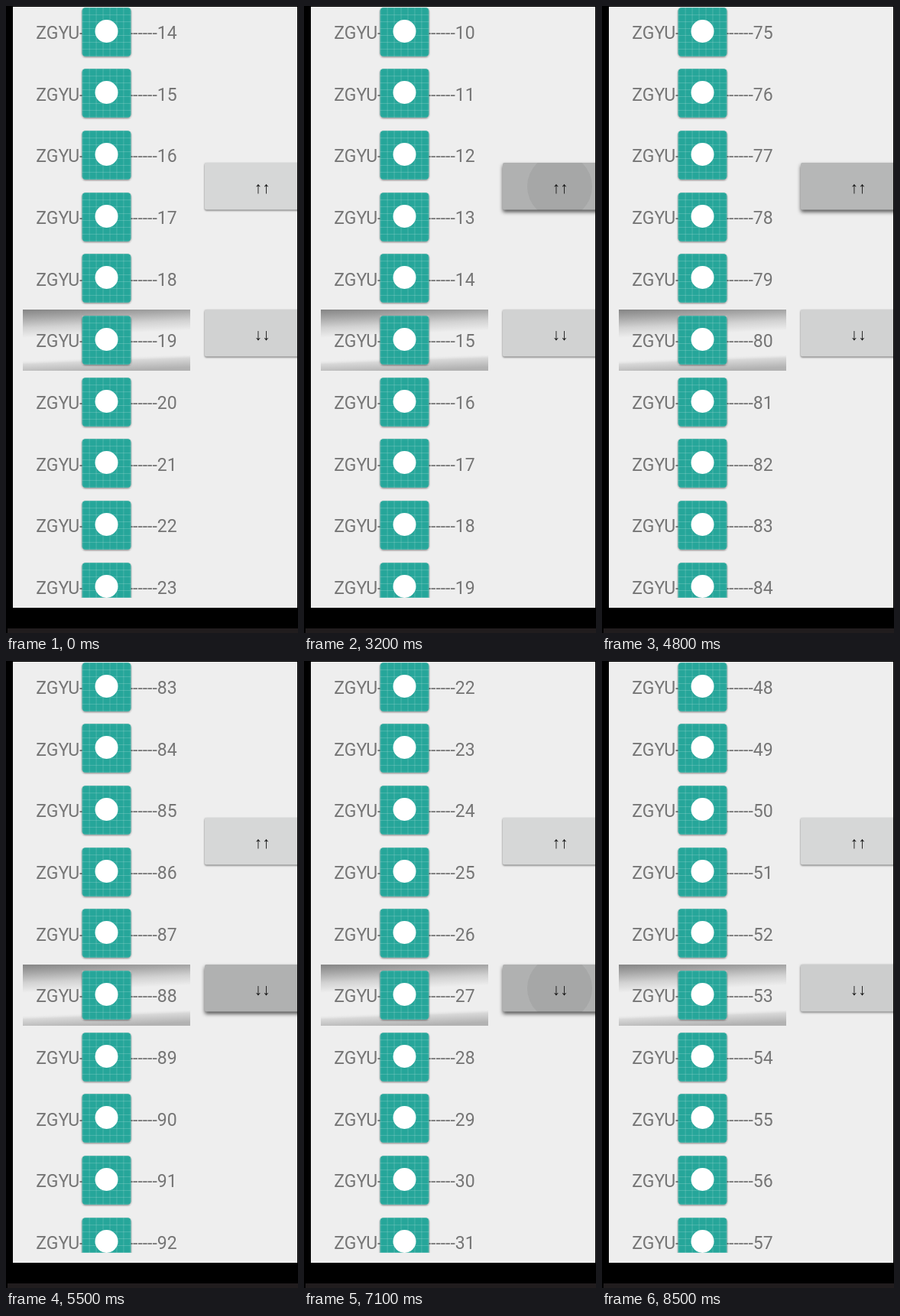
Animation, 382 px wide and 820 px high, one loop 8.9 s. Source, as an HTML page:

```html
<!DOCTYPE html>
<html lang="en">
<head>
<meta charset="utf-8">
<title>Channel wheel</title>
<style>
  html, body { margin: 0; width: 100%; height: 100%; overflow: hidden; background: #000; }
  svg { display: block; }
  .row { font: 23px Roboto, sans-serif; fill: #757575; text-anchor: middle; }
  .arrows { font: 21px "Liberation Sans", Arial, sans-serif; fill: #151515; text-anchor: middle; }
  .tile { filter: drop-shadow(0 1.2px 1px rgba(0, 0, 0, .45)); }
</style>
</head>
<body>
<svg width="382" height="820" viewBox="0 0 382 820">
  <defs>
    <linearGradient id="top" gradientUnits="userSpaceOnUse" x1="22" y1="397" x2="23.7" y2="434">
      <stop offset="0" stop-color="#848484"/>
      <stop offset=".3" stop-color="#a6a6a6"/>
      <stop offset=".65" stop-color="#d2d2d2"/>
      <stop offset="1" stop-color="#eee"/>
    </linearGradient>
    <linearGradient id="bottom" gradientUnits="userSpaceOnUse" x1="130" y1="459" x2="130.7" y2="477">
      <stop offset="0" stop-color="#eee" stop-opacity="0"/>
      <stop offset=".3" stop-color="#d8d8d8"/>
      <stop offset="1" stop-color="#b2b2b2"/>
    </linearGradient>
    <clipPath id="list"><rect x="9" y="1" width="240" height="773"/></clipPath>
    <clipPath id="face"><rect x="260" width="121" height="62"/></clipPath>
    <g id="tile">
      <rect class="tile" x="-32" y="-32" width="64" height="64" rx="4.5" fill="#26a69a"/>
      <path id="grid" stroke="#fff" stroke-opacity=".2" stroke-width=".9"/>
      <circle cy="-1" r="15" fill="#fff"/>
    </g>
  </defs>
  <rect x="9" y="1" width="372" height="786" fill="#eee"/>
  <rect x="22" y="397" width="219" height="80" fill="url(#top)"/>
  <rect x="22" y="457" width="219" height="20" fill="url(#bottom)"/>
  <g id="rows" clip-path="url(#list)"></g>
  <g id="buttons"></g>
  <rect x="381" width="1" height="814"/>
  <rect x="2" y="814" width="380" height="6" fill="#211d1e"/>
</svg>
<script>
const LOOP = 8900, STEP = 100;
const ROWS = 10, PITCH = 80.67, PICKED = 5, COUNT = 100, FIRST = 19;
const TAP = 3, LONG_PRESS = 500, RATE = .024;   // rows per tap, ms, rows per ms
const LAG = 50;                                 // touch to visible feedback

const up = { y: 205, label: "↑↑", rest: 214 };
const down = { y: 397, label: "↓↓", rest: 209 };
const buttons = [up, down];

const presses = [
  { button: down, dir: 1, from: 1350, to: 1700 },
  { button: up, dir: -1, from: 2550, to: 4700 },
  { button: down, dir: 1, from: 4750, to: 8200 }
];

const byId = id => document.getElementById(id);
const clamp = (x, a, b) => Math.min(b, Math.max(a, x));
const ramp = (t, from, length) => clamp((t - from) / length, 0, 1);

function add(parent, name, attrs, text = "") {
  const el = document.createElementNS("http://www.w3.org/2000/svg", name);
  for (const key in attrs) el.setAttribute(key, attrs[key]);
  el.textContent = text;
  return parent.appendChild(el);
}

let lines = "";
for (let i = 0; i < 8; i++) {
  const p = -31.3 + i * 8.95;
  lines += `M${p} -32V32M-32 ${p}H32`;
}
byId("grid").setAttribute("d", lines);

const labels = [];
for (let i = 0; i < ROWS; i++) {
  const y = i * PITCH;
  labels.push(add(byId("rows"), "text", { class: "row", x: 131.5, y: Math.round(43 + y) }));
  add(byId("rows"), "use", { href: "#tile", x: 131.5, y: Math.floor(34 + y) });
}

for (const b of buttons) {
  const g = add(byId("buttons"), "g", { transform: `translate(0 ${b.y})` });
  b.face = add(g, "rect", { x: 260, width: 140, height: 61.5, rx: 2 });
  const clip = add(g, "g", { "clip-path": "url(#face)" });
  b.spot = add(clip, "circle", { cx: 334.5, cy: 31, r: 42.5 });
  add(g, "text", { class: "arrows", x: 335, y: 40 }, b.label);
}

// A tap moves a few rows; after the long-press delay the list runs on steadily.
function selectedAt(t) {
  return presses.reduce((row, p) => {
    const held = Math.max(0, Math.min(t, p.to) - p.from - LONG_PRESS);
    return row + p.dir * (TAP * ramp(t, p.from, 300) + RATE * held);
  }, FIRST);
}

function drawButton(b, t) {
  let level = 0, spot = 0;
  for (const p of presses.filter(p => p.button === b)) {
    const hold = p.from + LONG_PRESS;
    level += ramp(t, p.from + LAG, 150) - ramp(t, p.to + LAG, 300);
    // the upward ripple fades while held, the downward one stays until release
    const fade = b === up ? hold + 250 : p.to;
    if (p.to > hold) spot += ramp(t, hold + 250 * (p.dir > 0), 50) * (1 - ramp(t, fade, 300));
  }
  const grey = Math.round(b.rest + (176 - b.rest) * level);
  b.face.style.fill = `rgb(${grey},${grey + 1},${grey + 1})`;
  b.face.style.filter =
    `drop-shadow(0 ${1.4 + 2.2 * level}px ${1.2 + 1.6 * level}px rgba(0,0,0,${.55 + .1 * level}))`;
  b.spot.style.opacity = .06 * spot;
}

function draw(t) {
  const top = Math.round(selectedAt(t)) - PICKED;
  labels.forEach((el, i) => {
    const n = (top + i + COUNT) % COUNT;
    el.textContent = "ZGYU" + "-".repeat(16) + n;
  });
  buttons.forEach(b => drawButton(b, t));
}

const start = performance.now();
function tick() {
  const t = (performance.now() - start) % LOOP;
  draw(Math.floor(t / STEP) * STEP);
  requestAnimationFrame(tick);
}
tick();
</script>
</body>
</html>
```
